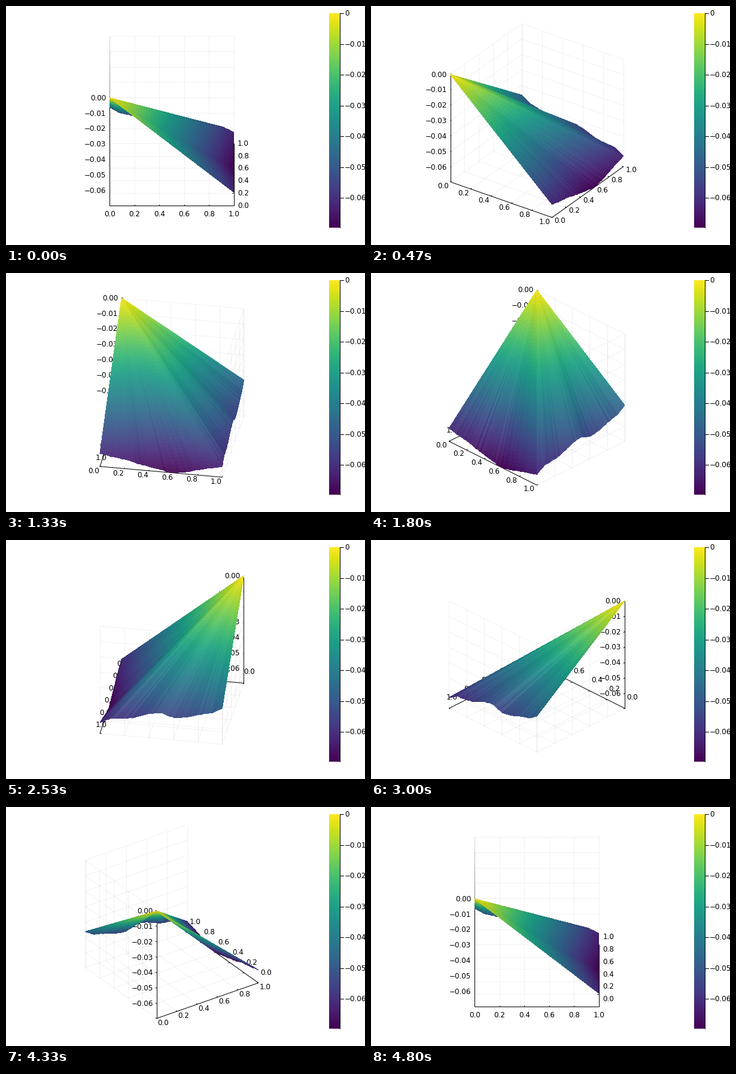
Animation of 600x400 px, one loop 4.87 s. Source, as a matplotlib script:

```python
import numpy as np
import matplotlib.pyplot as plt
from matplotlib.animation import FuncAnimation
from matplotlib.collections import LineCollection, PolyCollection

W, H, DPI = 600, 400, 100
LOOP, STEPS, HOLD = 4870, 73, 3
CENTER = np.array([277.2, 191.75])
SIZE = 207.6
ELEV = np.radians(30)
Z_MIN = -0.0696
PX = 72 / DPI
TICK = 0.014
BASELINE = 4.0
XY_TICKS = np.linspace(0, 1, 6)
Z_TICKS = -0.01 * np.arange(7)

# height of the outer rim above the floor, in pixels at full box height 180
SIDE_X = [(0, 22), (.06, 19.5), (.13, 17.8), (.2, 15.8), (.26, 13),
          (.3, 10.8), (.435, 6), (.59, 0), (.665, 2.5), (.74, 5),
          (.8, 9), (.87, 12), (1, 18)]
SIDE_Y = [(0, 60.5), (.05, 55), (.08, 51.5), (.18, 46.5), (.22, 44),
          (.3, 40.3), (.385, 36.8), (.45, 40.3), (.505, 44), (.6, 40.5),
          (.67, 35), (.74, 30.5), (.8, 29), (.87, 27.5), (.91, 27.5),
          (.95, 23), (1, 18)]

plt.rcParams["font.family"] = "DejaVu Sans"
viridis = plt.get_cmap("viridis")


def level(z):
    """Data z to box height 0..1."""
    return 1 - z / Z_MIN


def project(points, turn):
    x, y, z = np.moveaxis(np.asarray(points, float) - 0.5, -1, 0)
    c, s = np.cos(turn), np.sin(turn)
    depth = y * c - x * s
    sx = CENTER[0] + SIZE * (x * c + y * s)
    sy = CENTER[1] - SIZE * (depth * np.sin(ELEV) + z * np.cos(ELEV))
    return np.stack([sx, sy], axis=-1)


def build_surface(per_side=46, rings=48):
    """Fan of straight rays from the apex to a rough rim."""
    t = np.linspace(0, 1, per_side + 1)
    one = np.ones_like(t)
    rim_x = np.column_stack([one, t, np.interp(t, *zip(*SIDE_X)) / 180])
    rim_y = np.column_stack([t, one, np.interp(t, *zip(*SIDE_Y)) / 180])[::-1]
    rim = np.vstack([rim_x, rim_y[1:]])
    noise = np.random.default_rng(4).normal(0, 0.35, len(rim))
    rim[:, 2] = np.clip(rim[:, 2] + noise / 180, 0, 1)

    apex = np.array([0, 0, 1.0])
    rays = rim - apex
    normals = np.cross(rays[:-1], rays[1:])
    normals /= np.linalg.norm(normals, axis=1, keepdims=True)
    r = np.linspace(0, 1, rings + 1)[:, None, None]
    return apex + r * rays, normals


def corners(grid):
    """Grid of points to a list of four-cornered cells."""
    quads = np.stack([grid[:-1, :-1], grid[1:, :-1],
                      grid[1:, 1:], grid[:-1, 1:]], axis=2)
    return quads.reshape(-1, 4, grid.shape[-1])


def box_lines():
    grid, axes = [], []
    for t in XY_TICKS:
        grid += [[(t, 0, 0), (t, 1, 0)], [(t, 1, 0), (t, 1, 1)],
                 [(1, t, 0), (0, t, 0)], [(0, t, 0), (0, t, 1)]]
        axes += [[(t, 0, 0), (t, TICK, 0)], [(1, t, 0), (1 - TICK, t, 0)]]
    for h in level(Z_TICKS):
        grid += [[(0, 0, h), (0, 1, h)], [(0, 1, h), (1, 1, h)]]
        axes.append([(0, 0, h), (0, TICK, h)])
    axes += [[(0, 0, 0), (1, 0, 0)], [(1, 0, 0), (1, 1, 0)],
             [(0, 0, 0), (0, 0, 1)]]
    return np.array(grid, float), np.array(axes, float)


def label_shift(angle):
    """Pixel offset of a label's middle for an outward tick direction."""
    if angle > 360:
        angle -= 360
    if angle == 90:
        return 0, 14
    if angle == 270:
        return 0, -20
    lift = abs(np.sin(np.radians(angle)))
    if angle <= 180:
        side = 1 if angle < 90 else -1
        return side * (9 + 7 * abs(1 - angle / 90)) - 0.4, 7.3 * lift ** 0.5
    return 1 + (angle - 180) / 12, -12.5 - 7.5 * lift ** 0.7


def number(value, digits):
    return f"{value:.{digits}f}".replace("-", "\u2212") if value else f"{0:.{digits}f}"


fig = plt.figure(figsize=(W / DPI, H / DPI), dpi=DPI, facecolor="white")
ax = fig.add_axes([0, 0, 1, 1])


def label(text, align, x=0, y=0):
    return ax.text(x, y + BASELINE, text, fontsize=12 * PX, ha=align,
                   va="baseline", zorder=3)


def draw_colorbar():
    top, bottom, right = 12, 371, 558
    ax.imshow(np.linspace(1, 0, 256)[:, None], cmap=viridis, aspect="auto",
              extent=(540, right, bottom, top), interpolation="nearest")
    ax.plot([right, right], [top, bottom], color="black", lw=PX)
    for z in Z_TICKS:
        y = bottom + (top - bottom) * level(z)
        ax.plot([right, right + 6], [y, y], color="black", lw=PX)
        label(number(z, 2 if z else 0), "left", 566, y)


draw_colorbar()
ax.set_xlim(0, W)
ax.set_ylim(H, 0)
ax.axis("off")

surface, normals = build_surface()
cells = corners(surface)
cell_mid = cells.mean(axis=1)
cell_rgb = viridis(cell_mid[:, 2])[:, :3]
cell_ray = np.tile(np.arange(len(normals)), len(surface) - 1)
grid_lines, axis_lines = box_lines()

grid_art = LineCollection([], colors=[(0, 0, 0, 0.055)], linewidths=PX, zorder=1)
axis_art = LineCollection([], colors="black", linewidths=PX, zorder=2)
mesh_art = PolyCollection([], edgecolors="none", antialiaseds=False, zorder=4)
for art in (grid_art, axis_art, mesh_art):
    ax.add_collection(art, autolim=False)

x_labels = [label(number(t, 1), "center") for t in XY_TICKS]
y_labels = [label(number(t, 1), "center") for t in XY_TICKS]
z_labels = [label(number(z, 2), "right") for z in Z_TICKS]
zero, one = np.zeros(6), np.ones(6)
x_spots = np.column_stack([XY_TICKS, zero, zero])
y_spots = np.column_stack([one, XY_TICKS, zero])
z_spots = np.column_stack([np.zeros(7), np.zeros(7), level(Z_TICKS)])


def place(labels, spots, turn, shift):
    for text, (x, y) in zip(labels, project(spots, turn)):
        text.set_position((x + shift[0], y + shift[1] + BASELINE))


def pose(degrees):
    turn = np.radians(degrees)
    grid_art.set_segments(project(grid_lines, turn))
    axis_art.set_segments(project(axis_lines, turn))
    place(x_labels, x_spots, turn, label_shift(degrees + 90))
    place(y_labels, y_spots, turn, label_shift(degrees))
    place(z_labels, z_spots, turn, (-6, 0))

    camera = np.array([np.sin(turn) * np.cos(ELEV),
                       -np.cos(turn) * np.cos(ELEV), np.sin(ELEV)])
    order = np.argsort(cell_mid @ camera)
    # slanted faces are dimmer, faces turned to the viewer a bit washed out
    facing = np.abs(normals @ camera)[cell_ray][:, None]
    rgb = cell_rgb * (0.86 + 0.14 * facing)
    rgb += 0.13 * facing ** 6 * (0.85 - rgb)
    mesh_art.set_verts(project(cells[order], turn))
    mesh_art.set_facecolor(np.clip(rgb[order], 0, 1))


def update(tick):
    # turns come in hard steps of 5 degrees, each held for a few ticks;
    # a step starts one tick early because its time is rounded down
    step = min((tick + 1) // HOLD, STEPS - 1)
    if tick == 0 or (tick + 1) % HOLD == 0:
        pose(5 * step)
    return []


FRAMES = STEPS * HOLD
anim = FuncAnimation(fig, update, frames=FRAMES, interval=LOOP / FRAMES,
                     repeat=True, repeat_delay=0, blit=False)
plt.show()
```
